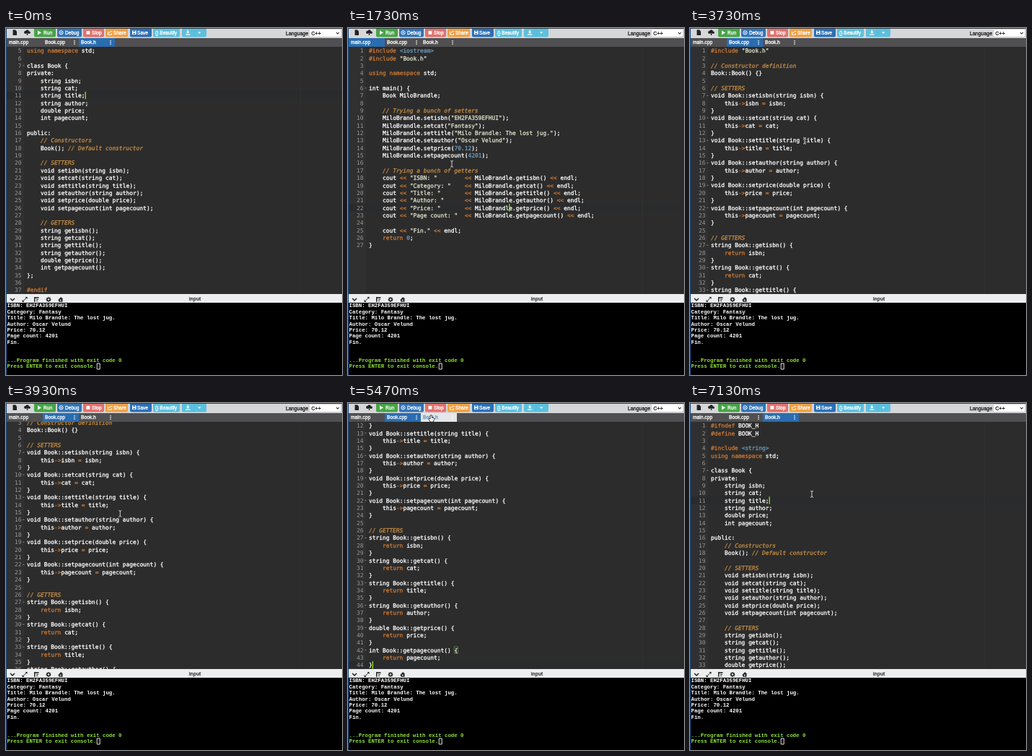
Write an HTML page with a canvas that moves like this. It is 466 px wide and 480 px high and loops after 7.19 s.

```html
<!DOCTYPE html>
<html lang="en">
<head>
<meta charset="utf-8">
<title>Code editor</title>
<style>
html, body { margin: 0; width: 466px; height: 480px; overflow: hidden; background: #000; }
canvas { display: block; }
</style>
</head>
<body>
<canvas id="stage" width="466" height="480"></canvas>
<script>
const g = document.getElementById('stage').getContext('2d');
const LOOP = 7190, TICK = 1000 / 15;
const MONO = '7.87px "DejaVu Sans Mono", monospace';
const TERM = 'bold 7.37px "Liberation Mono", "Courier New", monospace';
const UI = '"Liberation Sans", Arial, sans-serif';
const X0 = 29, ADV = 4.74, ROW = 10.35, TOP = 26, BOTTOM = 368;

// ---- file contents ----
const fields = [['string', 'isbn'], ['string', 'cat'], ['string', 'title'],
  ['string', 'author'], ['double', 'price'], ['int', 'pagecount']];
const values = ['"EH2FA359EFHUI"', '"Fantasy"', '"Milo Brandle: The lost jug."',
  '"Oscar Velund"', '70.12', '4201'];
const labels = ['ISBN', 'Category', 'Title', 'Author', 'Price', 'Page count'];
const tab = '    ';

const header = [
  '#ifndef BOOK_H', '#define BOOK_H', '', '#include <string>', 'using namespace std;', '',
  'class Book {', 'private:',
  ...fields.map(([t, n]) => `${tab}${t} ${n};`),
  '', 'public:', tab + '// Constructors', tab + 'Book(); // Default constructor', '',
  tab + '// SETTERS', ...fields.map(([t, n]) => `${tab}void set${n}(${t} ${n});`), '',
  tab + '// GETTERS', ...fields.map(([t, n]) => `${tab}${t} get${n}();`),
  '};', '', '#endif'];

const body = [
  '#include "Book.h"', '', '// Constructor definition', 'Book::Book() {}', '', '// SETTERS',
  ...fields.flatMap(([t, n]) => [`void Book::set${n}(${t} ${n}) {`, `${tab}this->${n} = ${n};`, '}']),
  '', '// GETTERS',
  ...fields.flatMap(([t, n]) => [`${t} Book::get${n}() {`, `${tab}return ${n};`, '}'])];

const main = [
  '#include <iostream>', '#include "Book.h"', '', 'using namespace std;', '',
  'int main() {', tab + 'Book MiloBrandle;', '', tab + '// Trying a bunch of setters',
  ...fields.map(([, n], i) => `${tab}MiloBrandle.set${n}(${values[i]});`),
  '', tab + '// Trying a bunch of getters',
  ...fields.map(([, n], i) =>
    `${tab}cout << "${labels[i]}: "`.padEnd(28) + `<< MiloBrandle.get${n}() << endl;`),
  '', tab + 'cout << "Fin." << endl;', tab + 'return 0;', '}'];

const output = [...labels.map((l, i) => `${l}: ${values[i].replace(/"/g, '')}`), 'Fin.'];

const files = [
  { name: 'main.cpp', x: 1, lines: main, row: 22, col: 41 },
  { name: 'Book.cpp', x: 51, lines: body, row: 44, col: 1, match: [42, 25] },
  { name: 'Book.h', x: 101, lines: header, row: 11, col: 17 }];

// ---- timeline ----
const shows = [[0, 2], [1270, 0], [3330, 1], [5670, 2]];   // time, file index
const mousePath = [
  [70, 150, 200], [600, 32, 26], [730, 22, 21], [1270, 22, 21], [1500, 100, 130],
  [1730, 144, 188], [2100, 150, 205], [2500, 140, 150], [2870, 83, 22], [3330, 83, 22],
  [3730, 159, 156], [4470, 155, 140], [4800, 137, 33], [5000, 118, 22], [5670, 115, 21],
  [5930, 125, 32], [6200, 171, 144], [6330, 171, 144], [6470, 169, 126], [LOOP, 169, 126]];

const ease = p => { p = Math.min(1, Math.max(0, p)); return p * p * (3 - 2 * p); };

function mouseAt(t) {
  if (t < 60) return null;
  let i = 1;
  while (i < mousePath.length - 1 && mousePath[i][0] < t) i++;
  const [ta, xa, ya] = mousePath[i - 1], [tb, xb, yb] = mousePath[i];
  const p = ease((t - ta) / (tb - ta));
  return { x: xa + (xb - xa) * p, y: ya + (yb - ya) * p };
}

function scrollAt(t, file) {
  if (file === 1) return 11 * ease((t - 3730) / 670);
  if (file === 2) return 4 * (1 - ease((t - 6600) / 500));
  return 0;
}

// ---- drawing helpers ----
function box(x, y, w, h, c) { g.fillStyle = c; g.fillRect(x, y, w, h); }

// A hairline stroke gives the glyphs a slightly heavier weight.
function text(s, x, y, c, font, align = 'left', weight = 0.3) {
  g.font = font; g.textAlign = align; g.textBaseline = 'alphabetic';
  g.fillStyle = g.strokeStyle = c; g.lineWidth = weight; g.lineJoin = 'round';
  g.fillText(s, x, y);
  if (weight) g.strokeText(s, x, y);
}

function shape(pts, c, outline) {
  g.beginPath();
  pts.forEach(([x, y]) => g.lineTo(x, y));
  g.closePath();
  if (outline) { g.strokeStyle = outline; g.lineWidth = 1.4; g.stroke(); }
  g.fillStyle = c; g.fill();
}

function line(pts, c, w = 1) {
  g.beginPath();
  pts.forEach(([x, y], i) => i ? g.lineTo(x, y) : g.moveTo(x, y));
  g.strokeStyle = c; g.lineWidth = w; g.stroke();
}

function disc(x, y, r, c) {
  g.beginPath(); g.arc(x, y, r, 0, 7); g.fillStyle = c; g.fill();
}

function ring(x, y, r, c, w = 1) {
  g.beginPath(); g.arc(x, y, r, 0, 7); g.strokeStyle = c; g.lineWidth = w; g.stroke();
}

function dots(x, y, c) { for (const d of [-2.3, 0, 2.3]) disc(x, y + d, 0.8, c); }

// ---- toolbar ----
const buttons = [
  [39, 30, '#47a447', 'Run', 52], [71, 34, '#3273b5', 'Debug', 82], [107, 29, '#e0716e', 'Stop', 119],
  [138, 31, '#f0a045', 'Share', 149], [172, 30, '#2a70b8', 'Save', 182],
  [204, 37, '#5bc0de', '{} Beautify', 207], [244, 34, '#5bc0de', '', 0]];

function toolbar() {
  box(0, 0, 466, 14, '#d6d7d9');
  for (const [x, w, c, label, tx] of buttons) {
    g.beginPath(); g.roundRect(x, -3, w, 15.5, 2); g.fillStyle = c; g.fill();
    text(label, tx, 8.8, '#fff', '6.6px ' + UI);
  }
  const w = '#fff', k = '#222';
  shape([[9.5, 2.5], [13, 2.5], [15, 4.7], [15, 10], [9.5, 10]], k);
  disc(27, 6, 2, k); disc(29.5, 4.8, 2.3, k); disc(32, 6.2, 1.8, k);
  line([[29.5, 6], [29.5, 10]], k, 1.4);
  shape([[44, 3.4], [49, 6.4], [44, 9.4]], w);
  ring(76.5, 6.4, 2.6, w); disc(76.5, 6.4, 1, w);
  box(111.5, 4, 4.8, 4.8, w);
  line([[141.5, 5], [141.5, 9.2], [146.5, 9.2], [146.5, 7.5]], w);
  line([[143, 7], [144.5, 4.8], [147.5, 4.8]], w);
  box(175, 3.5, 5.6, 5.6, w); box(176.3, 3.5, 2.8, 1.7, '#2a70b8'); box(176.4, 6.8, 2.8, 1.6, '#2a70b8');
  line([[252.2, 2.8], [252.2, 6]], w, 1.5);
  shape([[249.8, 5], [254.6, 5], [252.2, 7.8]], w);
  line([[249, 9], [255.4, 9]], w, 1.2);
  box(260.5, 0, 0.6, 12.5, '#46b8da');
  shape([[266, 5.6], [270.4, 5.6], [268.2, 8]], w);
  text('Language', 388, 9.8, '#222', '7px ' + UI);
  g.beginPath(); g.roundRect(420.5, 1.5, 44.5, 11, 2);
  g.fillStyle = '#fff'; g.fill(); g.strokeStyle = '#bbb'; g.lineWidth = 0.8; g.stroke();
  text('C++', 423.5, 9.7, '#222', '7px ' + UI);
  line([[458, 6], [460, 8.2], [462, 6]], '#333', 1.1);
  box(0, 0, 466, 1, '#3a3d42');
}

function tabs(active, mouse) {
  box(0, 14, 466, 12, '#505052');
  files.forEach((f, i) => {
    const over = mouse && mouse.y >= 14 && mouse.y < 26 && mouse.x >= f.x && mouse.x < f.x + 50;
    if (i === active) box(f.x, 14, 50, 12, '#2a6db0');
    else if (over) box(f.x, 14, 50, 12, '#e4e6ea');
    text(f.name, f.x + 3, 22.2, over && i !== active ? '#6b8fb0' : '#fff', '6.7px ' + UI);
    if (i) dots(f.x + 44, 20, '#fff');
  });
}

// ---- editor ----
const lexer = /\/\/.*|"[^"]*"|#\w+|<\w+>|<<|->|=|[A-Za-z_][\w:.]*|\d[\d.]*|\S/g;

function tint(s) {
  if (s.startsWith('//')) return '#c48c45';
  if (s[0] === '"') return '#dde2cc';
  if (/^(#\w+|<<|->|=|return|using|namespace)$/.test(s)) return '#cc7833';
  if (/^(<\w+>|\d.*)$/.test(s)) return '#6c99bb';
  return '#fff';
}

function editor(t, index, since) {
  const f = files[index], top = scrollAt(t, index);
  const rowY = n => TOP + (n - 1 - top) * ROW;
  g.save();
  g.beginPath(); g.rect(0, TOP, 466, BOTTOM - TOP); g.clip();
  box(0, TOP, 466, BOTTOM - TOP, '#2c2c2c');
  box(1, TOP, 24, BOTTOM - TOP, '#303030');
  box(1, rowY(f.row), 465, ROW, '#2a2b2d');
  box(408, TOP, 1, BOTTOM - TOP, '#303030');
  f.lines.forEach((s, i) => {
    const y = rowY(i + 1), base = y + 8.2;
    if (y < TOP - ROW || y > BOTTOM) return;
    text(i + 1, 21.5, base, '#999', MONO, 'right', 0);
    if (s.endsWith('{')) line([[23.3, y + 5.3], [25.5, y + 5.3]], '#999', 0.8);
    for (const m of s.matchAll(lexer)) {
      const font = m[0].startsWith('//') ? 'italic ' + MONO : MONO;
      text(m[0], X0 + m.index * ADV, base, tint(m[0]), font);
    }
  });
  if (f.match) {
    g.strokeStyle = '#5c8a48'; g.lineWidth = 0.8;
    g.strokeRect(X0 + f.match[1] * ADV - 0.2, rowY(f.match[0]) + 0.5, ADV + 0.4, ROW - 1);
  }
  if ((t - since) % 1000 < 500) box(X0 + f.col * ADV, rowY(f.row), 1.2, ROW, '#91ff00');
  g.restore();
}

// ---- console ----
function terminal() {
  box(0, 380, 466, 100, '#000');
  const baseline = i => 386.4 + i * 8.4;
  output.forEach((s, i) => text(s, 1.5, baseline(i), '#fff', TERM, 'left', 0));
  text('...Program finished with exit code 0', 1.5, baseline(9), '#8ee535', TERM, 'left', 0);
  text('Press ENTER to exit console.', 1.5, baseline(10), '#8ee535', TERM, 'left', 0);
  g.strokeStyle = '#fff'; g.lineWidth = 0.9; g.strokeRect(126.2, 464, 4, 8);

  box(0, BOTTOM, 466, 12, '#eceef0');
  const k = '#222';
  text('input', 262, 377.3, k, 'bold 6.8px ' + UI, 'center', 0);
  line([[6, 374], [9, 377], [12, 374]], k, 1.5);
  line([[23.5, 378], [28.5, 373]], k);
  shape([[29.5, 372], [29.5, 375], [26.5, 372]], k);
  shape([[22.5, 379], [22.5, 376], [25.5, 379]], k);
  box(39, 372.3, 6.5, 1.6, k); box(39, 372.3, 1.5, 6.5, k);
  box(42, 375, 3, 0.9, k); box(42, 377, 2, 0.9, k);
  ring(59, 375.6, 2, k, 1.5);
  for (let a = 0; a < 8; a++) {
    const c = Math.cos(a * Math.PI / 4), s = Math.sin(a * Math.PI / 4);
    line([[59 + 2 * c, 375.6 + 2 * s], [59 + 3.4 * c, 375.6 + 3.4 * s]], k, 1.1);
  }
  shape([[72.5, 376], [76, 372.3], [78.5, 374], [78.5, 378.8], [73.5, 378.8]], k);
  disc(75.7, 376.4, 1, '#eceef0');
}

function pointer({ x, y }) {
  if (y < 26) {
    shape([[x - 1.2, y - 4], [x + 0.2, y - 4], [x + 0.4, y - 0.8], [x + 3.4, y],
      [x + 3.2, y + 2.6], [x + 2, y + 4.6], [x - 1.2, y + 4.6], [x - 3.4, y + 1],
      [x - 2.6, y + 0.4], [x - 1.2, y + 1.4]], '#fff', '#111');
    return;
  }
  for (const [c, w] of [['#222', 2.2], ['#f2f2f2', 0.9]]) {
    line([[x, y - 3.6], [x, y + 3.6]], c, w);
    for (const s of [-1, 1]) line([[x - 2, y + 4.4 * s], [x, y + 3.6 * s], [x + 2, y + 4.4 * s]], c, w);
  }
}

function draw(now) {
  const t = Math.floor((now % LOOP + 5) / TICK) * TICK;
  const [since, index] = shows.filter(s => s[0] <= t + 5).pop();
  const mouse = mouseAt(t);
  editor(t, index, since);
  toolbar();
  tabs(index, mouse);
  terminal();
  box(0, 0, 1, 480, '#1a4a86');
  if (mouse) pointer(mouse);
}

const start = performance.now();
function loop() {
  draw(performance.now() - start);
  requestAnimationFrame(loop);
}
loop();
</script>
</body>
</html>
```
